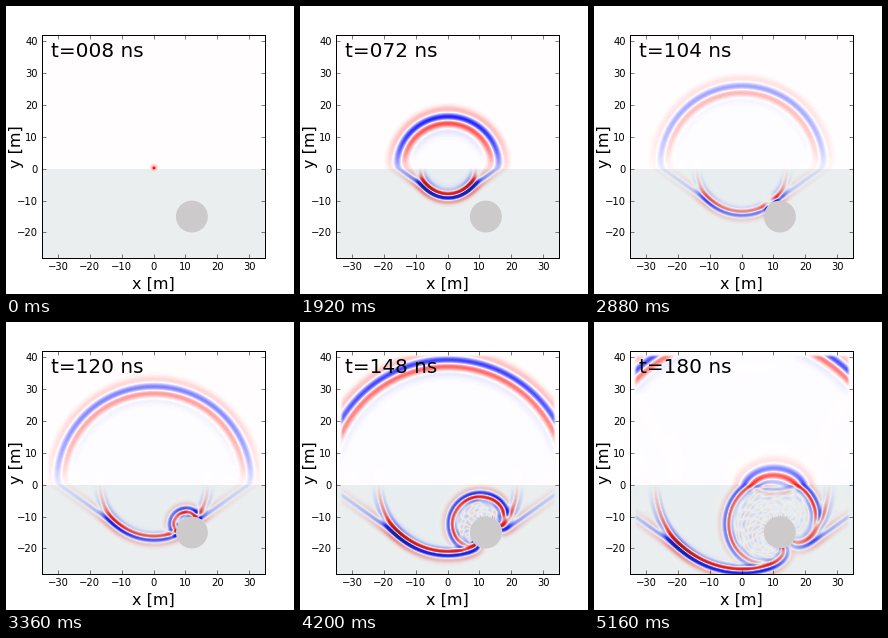
A matplotlib script for the animation above (5280 ms loop, 288x288 px).

```python
import numpy as np
import matplotlib.pyplot as plt
from matplotlib.animation import FuncAnimation
from matplotlib.patches import Circle, Rectangle

# Lengths in m, times in ns
C = 0.3
DX = 0.2
DT = 0.4
STEPS_PER_FRAME = 10
FRAMES = 44
T_FIRST, T_STEP = 8, 4
EPS_GROUND = 3.0
PIPE, RADIUS = (12, -15), 5
FREQ, DELAY = 0.05, 20.0

x = DX * np.arange(-205, 206)
y = -36 + DX * (np.arange(420) + 0.5)


def ricker(t):
    a = (np.pi * FREQ * (t - DELAY)) ** 2
    return -(1 - 2 * a) * np.exp(-a)


def inverse_eps(px, py):
    """1/eps at the given points, zero inside the conducting pipe."""
    gx, gy = np.meshgrid(px, py)
    eps = np.where(gy < -1e-6, EPS_GROUND, 1.0)
    eps[np.abs(gy) < 1e-6] = (1 + EPS_GROUND) / 2
    inside = np.hypot(gx - PIPE[0], gy - PIPE[1]) < RADIUS
    return np.where(inside, 0, 1 / eps)


def sponge():
    """Damping factor that absorbs waves near the outer rim."""
    dx = np.clip((np.abs(x) - 34.5) / 6.5, 0, 1)
    dy = np.clip((np.abs(y - 6) - 35) / 7, 0, 1)
    return np.exp(-0.25 * (dx[None, :] ** 2 + dy[:, None] ** 2))


def window():
    """Visible part of the field, fading out at the sides and the top."""
    wx = np.clip((33.7 - np.abs(x)) / 0.9, 0, 1)
    wy = np.clip((40.6 - y) / 0.9, 0, 1)
    return wx[None, :] * wy[:, None]


def simulate():
    """Magnetic field of a line source on the ground, one array per frame."""
    f32 = np.float32
    s = f32(C * DT / DX)
    h = np.zeros((y.size, x.size), f32)
    ex = np.zeros((y.size - 1, x.size), f32)
    ey = np.zeros((y.size, x.size - 1), f32)
    kx = (s * inverse_eps(x, y[:-1] + DX / 2)).astype(f32)
    ky = (s * inverse_eps(x[:-1] + DX / 2, y)).astype(f32)
    damp = sponge().astype(f32)
    view = window().astype(f32)
    row, col = np.argmin(np.abs(y - DX / 2)), x.size // 2

    first = round(T_FIRST / DT)
    fields = []
    for n in range(1, first + STEPS_PER_FRAME * (FRAMES - 1) + 1):
        ex += kx * (h[1:] - h[:-1])
        ey -= ky * (h[:, 1:] - h[:, :-1])
        ex *= damp[:-1]
        ey *= damp[:, :-1]
        h[1:-1] += s * (ex[1:] - ex[:-1])
        h[:, 1:-1] -= s * (ey[:, 1:] - ey[:, :-1])
        h[row, col] += ricker(n * DT)
        h *= damp
        if n >= first and (n - first) % STEPS_PER_FRAME == 0:
            shown = h * view
            fields.append(shown / np.abs(shown).max())
    return fields


fields = simulate()

plt.rcParams["font.family"] = "DejaVu Sans"
fig = plt.figure(figsize=(4, 4), dpi=72, facecolor="white")
ax = fig.add_axes([0.125, 0.125, 0.775, 0.775])

image = ax.imshow(fields[0], origin="lower", cmap="seismic", vmin=-1, vmax=1,
                  extent=(x[0] - DX / 2, x[-1] + DX / 2, -36, 48),
                  interpolation="bilinear", aspect="auto")
ax.add_patch(Rectangle((-35, -28), 70, 28, lw=0, alpha=0.2,
                       fc=(150 / 255, 178 / 255, 183 / 255)))
ax.add_patch(Circle(PIPE, RADIUS, lw=0, fc=(204 / 255, 202 / 255, 202 / 255),
                    zorder=2))

ax.set_xlim(-35, 35)
ax.set_ylim(-28, 42)
ax.set_xticks(range(-30, 31, 10))
ax.set_yticks(range(-20, 41, 10))
ax.tick_params(direction="in", length=4, width=0.5, pad=4, labelsize=10,
               top=True, right=True)
for spine in ax.spines.values():
    spine.set_linewidth(1)

fig.text(147.6 / 288, 5 / 288, "x [m]", size=16, ha="center", va="baseline")
fig.text(15 / 288, 147.6 / 288, "y [m]", size=16, rotation=90, ha="center",
         va="baseline", rotation_mode="anchor")
clock = ax.text(-32.2, 35, "", size=20, va="baseline", zorder=5)


def draw(i):
    image.set_data(fields[i])
    clock.set_text(f"t={T_FIRST + T_STEP * i:03d} ns")
    return image, clock


anim = FuncAnimation(fig, draw, frames=FRAMES, interval=120, repeat=True,
                     repeat_delay=0, blit=False)
plt.show()
```
